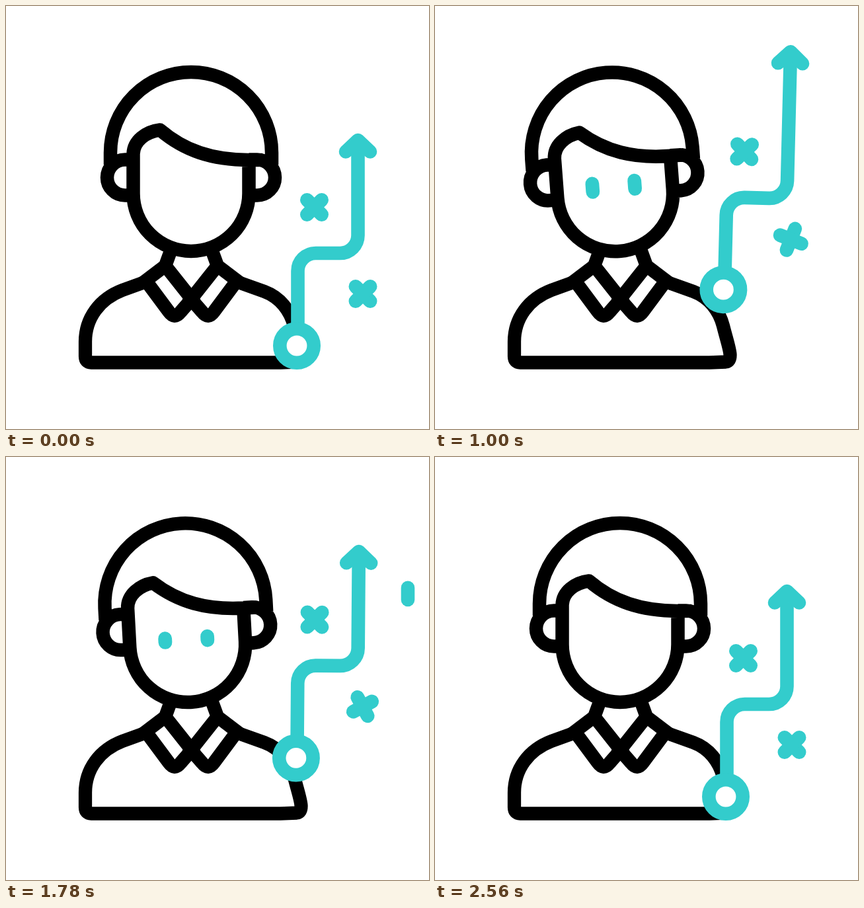
Recreate the animation shown at these times as an HTML page with a canvas. Size 640x640 px, loop 3 s.

```html
<!DOCTYPE html>
<html lang="en">
<head>
<meta charset="utf-8">
<style>
  html, body { margin: 0; width: 100%; height: 100%; overflow: hidden; background: #fff; }
  canvas { display: block; width: 640px; height: 640px; }
</style>
</head>
<body>
<canvas id="stage" width="640" height="640"></canvas>
<script>
const ctx = document.getElementById('stage').getContext('2d');
const LOOP = 3000, BLACK = '#000', TEAL = '#33cccc', RAD = Math.PI / 180;
const AXIS = 280.5;

const HEAD = new Path2D(
  'M158 240V222A122 122 0 0 1 402 222V240' +
  'M192.5 232.5H180A27 27 0 0 0 180 286.5H192.5' +
  'M367.5 232.5H380A27 27 0 0 1 380 286.5H367.5' +
  'M367.5 233V283.5A87.5 87.5 0 0 1 192.5 283.5V224' +
  'C193 204 212 190 233 187.5C270 219 312 233 367.5 233H388');
const COLLAR = new Path2D(
  'M249 371L241 393L281 443.5L264 463Q255 475 246 462L211.5 415.5L241 393');
const BODY = new Path2D(
  'M212 417L176 430C142 443 120 472 120 508V530Q120 539.5 129 539.5H415L440 538.5' +
  'Q446.5 538 446.5 528C446.5 520 441 504 436 484C430 461 415 441 391 432L349 417');

// Eased value between keyframes given as [time, value] pairs.
function tween(t, ...keys) {
  if (t <= keys[0][0]) return keys[0][1];
  for (let i = 1; i < keys.length; i++) {
    const [t0, v0] = keys[i - 1], [t1, v1] = keys[i];
    if (t < t1) return v0 + (v1 - v0) * (1 - Math.cos(Math.PI * (t - t0) / (t1 - t0))) / 2;
  }
  return keys[keys.length - 1][1];
}

function pen(color, width = 20.4, cap = 'round', join = 'round') {
  ctx.strokeStyle = color;
  ctx.lineWidth = width;
  ctx.lineCap = cap;
  ctx.lineJoin = join;
}

function segment(x0, y0, x1, y1) {
  ctx.beginPath();
  ctx.moveTo(x0, y0);
  ctx.lineTo(x1, y1);
  ctx.stroke();
}

function drawBody() {
  pen(BLACK, 20.4, 'butt', 'miter');
  ctx.stroke(COLLAR);
  ctx.save();
  ctx.translate(2 * AXIS, 0);
  ctx.scale(-1, 1);
  ctx.stroke(COLLAR);
  ctx.restore();
  pen(BLACK, 20.3);
  ctx.stroke(BODY);
}

function drawHead(t) {
  const tilt = tween(t, [240, 0], [597, 4.4], [1027, -4.4], [1460, 4.3], [1890, -4.4], [2390, 0]);
  const open = tween(t, [765, 0], [1190, 1], [1390, 1], [1740, 0.25], [2130, 1], [2500, 0]);
  ctx.save();
  ctx.translate(280, 382);
  ctx.rotate(tilt * RAD);
  ctx.translate(-280, -382);
  pen(BLACK, 20.5, 'butt');
  ctx.stroke(HEAD);
  if (open > 0) {
    pen(TEAL, 20.8);
    for (const x of [246.5, 310.5]) segment(x, 278.5, x, 278.4 - 21 * open);
  }
  ctx.restore();
}

function drawCross(x, y, burst) {
  const reach = 11.1 * (1 + 0.46 * burst);
  ctx.save();
  ctx.translate(x, y);
  ctx.rotate(270 * burst * RAD);
  pen(TEAL, 20.8);
  segment(-reach, -reach, reach, reach);
  segment(-reach, reach, reach, -reach);
  ctx.restore();
}

function drawArrow(t) {
  const lift = tween(t, [384, 0], [1312, 1], [2270, 0]);
  const stretch = 55 * tween(t, [450, 0], [1110, 1], [1310, 1], [1850, 0]);
  const angle = tween(t, [310, 0], [660, -5.7], [1005, 1.45], [1200, 1.45], [2130, 0]);
  ctx.save();
  ctx.translate(440 - angle * (angle < 0 ? 5.8 : 2.5), 514 - 113.5 * lift);
  ctx.rotate(angle * RAD);

  pen(TEAL, 20.6);
  ctx.beginPath();
  ctx.moveTo(1.5, -25);
  ctx.arcTo(1.5, -140, 92.5, -140, 27);
  ctx.arcTo(92.5, -140, 92.5, -300, 27);
  ctx.lineTo(92.5, -300 - stretch);
  ctx.stroke();
  ctx.beginPath();
  ctx.moveTo(74, -293.5 - stretch);
  ctx.lineTo(92.5, -311 - stretch);
  ctx.lineTo(111, -293.5 - stretch);
  ctx.stroke();

  ctx.beginPath();
  ctx.arc(0, 0, 25.7, 0, 2 * Math.PI);
  ctx.fillStyle = '#fff';
  ctx.fill();
  ctx.stroke();

  drawCross(26.5, -209.5, tween(t, [395, 0], [660, 1], [1010, 0]));
  drawCross(100, -78.5, tween(t, [880, 0], [1250, 1], [1880, 0]));
  ctx.restore();
}

// A dash that grows upward from its foot, then shrinks away at its top.
function drawDash(t, x, foot, top, start, full, end) {
  if (t <= start || t >= end) return;
  pen(TEAL, 20.6);
  segment(x, tween(t, [full, foot], [end, top]), x, tween(t, [start, foot], [full, top]) - 0.1);
}

function draw(t) {
  ctx.fillStyle = '#fff';
  ctx.fillRect(0, 0, 640, 640);
  drawBody();
  drawHead(t);
  drawArrow(t);
  drawDash(t, 608, 282, 198, 1360, 1580, 1870);
  drawDash(t, 578, 224, 91, 1970, 2180, 2380);
  drawDash(t, 39, 300, 215, 2080, 2310, 2540);
}

function frame() {
  draw(performance.now() % LOOP);
  requestAnimationFrame(frame);
}
frame();
</script>
</body>
</html>
```
